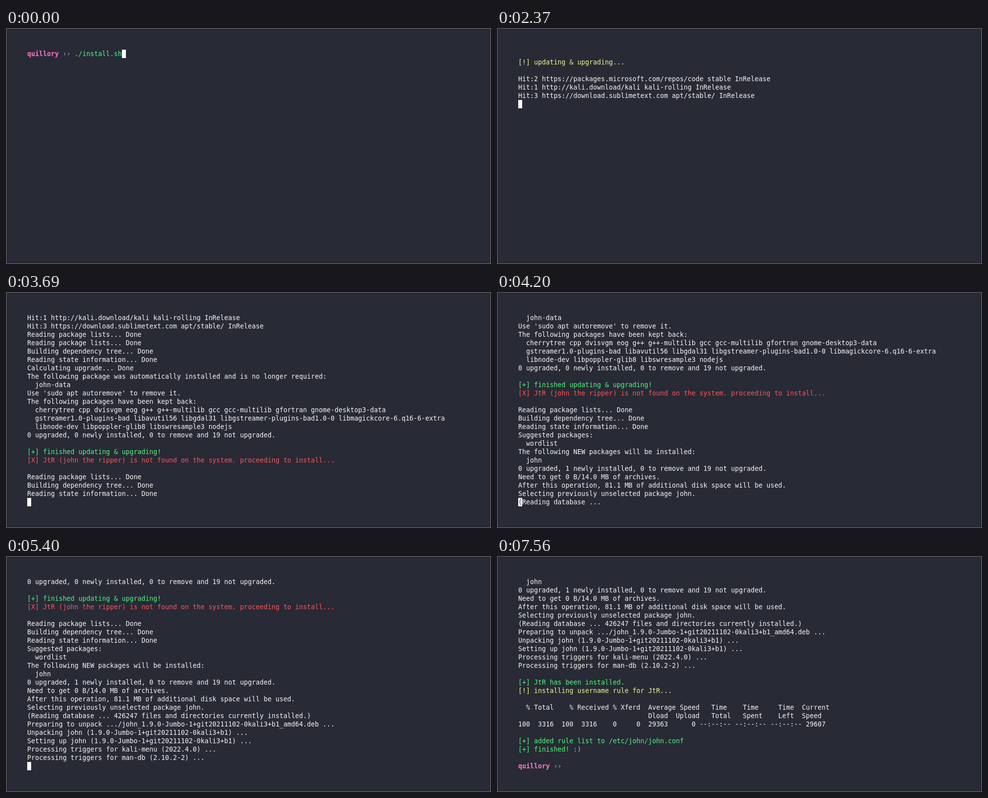
An HTML page for the animation above (8040 ms loop, 983 px wide and 479 px high).

```html
<!DOCTYPE html>
<html lang="en">
<head>
<meta charset="utf-8">
<title>Install script in a terminal</title>
<style>
  html, body { margin: 0; width: 100%; height: 100%; overflow: hidden; background: #282a36; }
  #stage {
    position: absolute; inset: 0; box-sizing: border-box;
    border: 1px solid #777; background: #282a36;
  }
  #screen, #cursor {
    position: absolute; margin: 0; white-space: pre;
    font: 13.288px/17px "DejaVu Sans Mono", monospace;
    font-variant-ligatures: none;
  }
  #screen { left: 42px; top: 43px; color: #f8f8f2; }
  #screen div { height: 17px; }
  #cursor { width: 8px; height: 17px; background: #fff; color: #282a36; }
  .info { color: #f1fa8c; }
  .good { color: #50fa7b; }
  .bad { color: #ff5555; }
  .user { color: #ff79c6; font-weight: bold; }
  .mark { color: #bd93f9; }
</style>
</head>
<body>
<div id="stage"><div id="screen"></div><div id="cursor"></div></div>
<script>
const LOOP = 8040, ROWS = 23, CELL_W = 8, CELL_H = 17, LEFT = 42, TOP = 43;
const USER = "quillory", PROMPT = USER + " ›› ", COMMAND = PROMPT + "./install.sh";

const LISTS = "Reading package lists... ";
const TREE = "Building dependency tree... ";
const STATE = "Reading state information... ";
const DATABASE = "(Reading database ... ";
const WORKING = "0% [Working]";
const CONNECTING = "0% [Connecting to kali.download (104.18.102.100)] " +
  "[Connecting to packages.microsoft.com] [Waiting for headers]";
const NO_DATA = "  0     0    0     0    0     0      0      0 --:--:-- --:--:-- --:--:--     0";

const LOG = `
[!] updating & upgrading...

Hit:2 https://packages.microsoft.com/repos/code stable InRelease
Hit:1 http://kali.download/kali kali-rolling InRelease
Hit:3 https://download.sublimetext.com apt/stable/ InRelease
${LISTS}Done
${LISTS}Done
${TREE}Done
${STATE}Done
Calculating upgrade... Done
The following package was automatically installed and is no longer required:
  john-data
Use 'sudo apt autoremove' to remove it.
The following packages have been kept back:
  cherrytree cpp dvisvgm eog g++ g++-multilib gcc gcc-multilib gfortran gnome-desktop3-data
  gstreamer1.0-plugins-bad libavutil56 libgdal31 libgstreamer-plugins-bad1.0-0 libmagickcore-6.q16-6-extra
  libnode-dev libpoppler-glib8 libswresample3 nodejs
0 upgraded, 0 newly installed, 0 to remove and 19 not upgraded.

[+] finished updating & upgrading!
[X] JtR (john the ripper) is not found on the system. proceeding to install...

${LISTS}Done
${TREE}Done
${STATE}Done
Suggested packages:
  wordlist
The following NEW packages will be installed:
  john
0 upgraded, 1 newly installed, 0 to remove and 19 not upgraded.
Need to get 0 B/14.0 MB of archives.
After this operation, 81.1 MB of additional disk space will be used.
Selecting previously unselected package john.
${DATABASE}426247 files and directories currently installed.)
Preparing to unpack .../john_1.9.0-Jumbo-1+git20211102-0kali3+b1_amd64.deb ...
Unpacking john (1.9.0-Jumbo-1+git20211102-0kali3+b1) ...
Setting up john (1.9.0-Jumbo-1+git20211102-0kali3+b1) ...
Processing triggers for kali-menu (2022.4.0) ...
Processing triggers for man-db (2.10.2-2) ...

[+] JtR has been installed.
[!] installing username rule for JtR...

  % Total    % Received % Xferd  Average Speed   Time    Time     Time  Current
                                 Dload  Upload   Total   Spent    Left  Speed
100  3316  100  3316    0     0  29363      0 --:--:-- --:--:-- --:--:-- 29607

[+] added rule list to /etc/john/john.conf
[+] finished! :)
`.split("\n");

// [start ms, finished lines, unfinished line, cursor column, cursor visible]
const on = (t, count, live = "", col = 0) => [t, count, live, col, true];
const off = (t, count, live = "", col = 0) => [t, count, live, col, false];
const STEPS = [
  on(0, 0, COMMAND, COMMAND.length),
  off(60, 0, COMMAND),
  on(360, 1),
  on(390, 0),
  on(1260, 2),
  on(1290, 3),
  on(1320, 3, WORKING, WORKING.length),
  on(1500, 3, CONNECTING, CONNECTING.length),
  on(1590, 6, WORKING, WORKING.length),
  on(1740, 6),
  off(1890, 6),
  on(2370, 6),
  on(2610, 6, LISTS + "0%"),
  on(3000, 7),
  on(3030, 7, LISTS + "0%"),
  on(3060, 7, LISTS + "100%"),
  on(3090, 8, TREE + "0%"),
  on(3120, 8, TREE + "50%"),
  on(3300, 11),
  on(3330, 19),
  on(3360, 23),
  on(3450, 23, LISTS + "0%"),
  on(3510, 24, TREE + "0%"),
  on(3540, 24, TREE + "50%"),
  on(3690, 26),
  on(3720, 31),
  on(3750, 32),
  on(3810, 33),
  on(4200, 34, DATABASE),
  on(4230, 34, DATABASE + "45%"),
  on(4260, 34, DATABASE + "70%"),
  on(4290, 34, DATABASE + "100%"),
  on(4320, 35),
  on(4350, 36),
  on(4410, 37),
  off(4680, 37),
  on(5160, 37),
  on(5250, 39),
  on(5400, 40),
  on(5580, 44),
  off(5640, 46, NO_DATA),
  off(5700, 51, PROMPT),
  on(6120, 51, PROMPT, PROMPT.length),
  off(6600, 51, PROMPT),
  on(7080, 51, PROMPT, PROMPT.length),
  off(7560, 51, PROMPT)
];

const CLEARED = 390;
const TAGS = { "[!]": "info", "[+]": "good", "[X]": "bad" };
const screenEl = document.getElementById("screen");
const cursorEl = document.getElementById("cursor");

function span(text, cls) {
  const el = document.createElement("span");
  el.textContent = text;
  if (cls) el.className = cls;
  return el;
}

function row(text) {
  const el = document.createElement("div");
  if (text.startsWith(USER)) {
    el.append(span(USER, "user"), span(" ›› ", "mark"), span(text.slice(PROMPT.length), "good"));
  } else {
    el.append(span(text, TAGS[text.slice(0, 3)]));
  }
  return el;
}

function draw([time, count, live, col, visible]) {
  const history = time < CLEARED ? [COMMAND] : LOG;
  const top = Math.max(0, count - ROWS + 1);
  screenEl.replaceChildren(...history.slice(top, count).concat(live).map(row));
  cursorEl.style.visibility = visible ? "visible" : "hidden";
  cursorEl.style.left = LEFT + col * CELL_W + "px";
  cursorEl.style.top = TOP + (count - top) * CELL_H + "px";
  cursorEl.textContent = live[col] || " ";
}

let shown = null;
const began = performance.now();
function tick() {
  const t = (performance.now() - began) % LOOP;
  const step = STEPS.findLast(s => s[0] <= t) || STEPS[0];
  if (step !== shown) draw(shown = step);
  requestAnimationFrame(tick);
}
tick();
</script>
</body>
</html>
```
